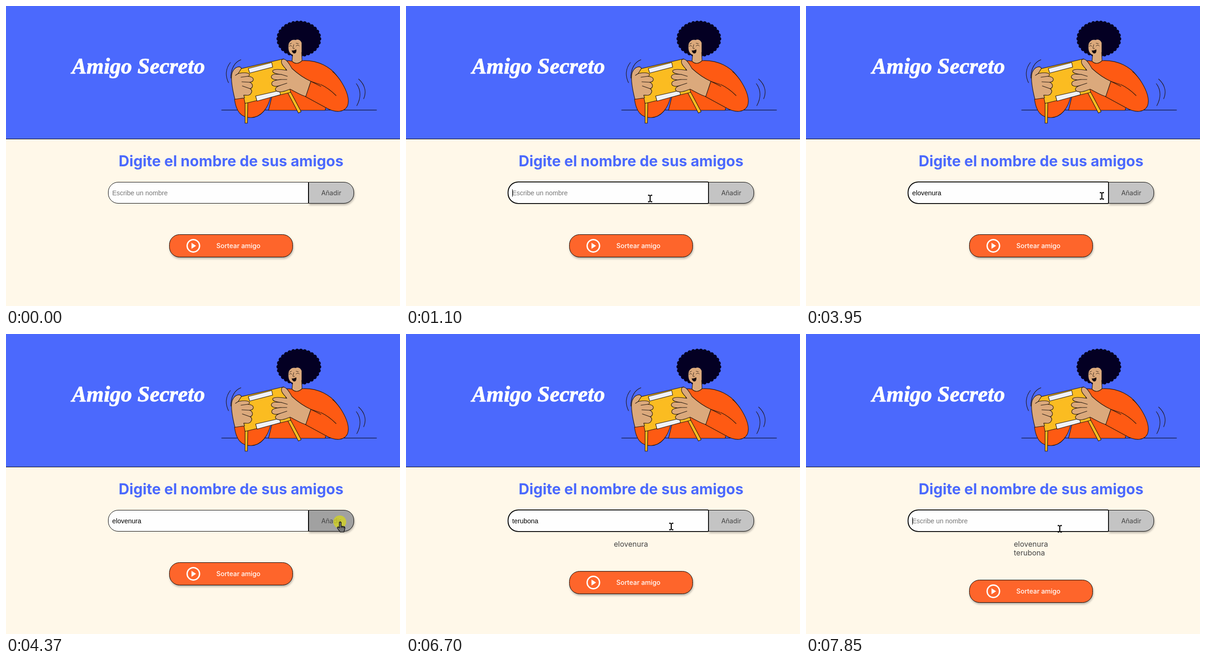
Animation of 857x653 px, one loop 8 s. Source, as an HTML page:

```html
<!DOCTYPE html>
<html lang="es">
<head>
<meta charset="utf-8">
<title>Amigo Secreto</title>
<style>
  html, body { margin: 0; width: 100%; height: 100%; overflow: hidden; background: #fff8e9; }
  svg { display: block; width: 857px; height: 653px; }
  text { font-family: Inter, sans-serif; font-optical-sizing: none; white-space: pre; }
  .title { font: italic 700 48px "Liberation Serif", serif; fill: #fff; stroke: #fff; stroke-width: 1px; }
  .heading { font-size: 32.2px; font-weight: 700; fill: #4b69fd; }
  .field { font: 14.4px "Liberation Sans", Arial, sans-serif; }
  .label { font-size: 14.22px; }
  .item { font-size: 16px; fill: #444; }
  .raised { filter: drop-shadow(1px 3px 2px rgba(0, 0, 0, .3)); }
  .art { stroke: #21160f; stroke-width: 1.15; stroke-linejoin: round; stroke-linecap: round; fill: none; }
  .skin { fill: #dba97c; }
  .shirt { fill: #fe5a13; }
  .gold { fill: #fbbc21; }
  .paper { fill: #f1f2f6; }
  .hair { fill: #040023; stroke: #040023; }
</style>
</head>
<body>
<svg viewBox="0 0 857 653">
  <rect width="857" height="653" fill="#fff8e9"/>
  <rect width="857" height="289" fill="#4b69fd"/>
  <path d="M0 289.5H857" stroke="#000"/>
  <text class="title" x="288" y="147" text-anchor="middle">Amigo Secreto</text>

  <g class="art">
    <path d="M469 226.5H806" stroke="#000" stroke-width="1"/>
    <path d="M488 123C477 137 477 153 484 167M511 117C497 122 489 137 489 157M767 159C782 172 784 189 778 202M762 169C773 183 772 201 763 217"/>

    <ellipse class="hair" cx="637" cy="71.5" rx="44" ry="35"/>
    <ellipse class="hair" cx="637" cy="71.5" rx="44" ry="35" stroke-width="9.5" stroke-dasharray="0 8.3"/>
    <path class="skin" d="M624 101L622 121Q632 130 644 120L643 101Z"/>
    <path class="skin" stroke="none" d="M615 82C613 94 615 103 623 106C632 109 641 107 643 100V80C640 73 634 72 630 74C624 72 618 75 615 82Z"/>
    <path stroke-width=".9" d="M616 88q3-4 6 0M631 87q4-4 7 0M626 84l-2 8q2 2 4 0M617 83l4-2M631 81l5 1"/>
    <path d="M622 97Q627 98 631 95Q632 102 627 103Q623 102 622 97Z" fill="#170b12"/>

    <path class="shirt" d="M571 227L580 190L598 121Q609 118 622 120Q632 130 644 119C681 117 707 135 719 151L694 227Z"/>
    <path class="shirt" d="M663 164L651 197L697 222C717 233 736 232 743 217C748 202 741 184 730 166Q722 153 711 143L684 171Z"/>
    <path class="shirt" stroke="none" d="M676 151L708 141L724 160L719 194L685 174Z"/>
    <path d="M663 164L685 175M685 171Q702 179 718 195"/>

    <path class="shirt" d="M497 203C500 225 508 243 533 243C555 242 570 223 576 196L520 199Z"/>
    <path class="gold" d="M520 210H526L525 255H520Z"/>
    <path class="gold" d="M613 189L619 187L642 230L636 233Z"/>
    <path class="gold" d="M504 138L604 115L619 188L520 212Z"/>
    <path class="paper" d="M527 136L578 123L580 133L530 146ZM543 196L595 184L597 193L546 207Z"/>

    <path class="skin" d="M498 203C493 184 488 157 492 145C497 132 510 129 512 136Q509 141 505 147Q523 143 529 148Q531 152 526 153Q538 154 538 160Q538 165 530 166Q537 169 536 175Q535 179 531 180Q537 184 533 190C530 196 523 194 517 194L519 200Z"/>
    <path d="M505 147L499 151M526 153L511 155M530 166L513 165M531 180L514 174"/>
    <path class="skin" d="M600 117C607 112 614 122 622 136C635 148 650 158 663 164L652 197C638 193 629 186 618 181C610 184 596 190 588 185C583 180 588 176 596 173C586 177 577 174 578 168C579 162 590 161 598 160C588 162 577 160 577 154C578 147 589 148 599 149C589 148 579 146 580 141C583 136 599 138 611 140C606 133 596 126 600 117Z"/>
    <path d="M596 173L611 168M598 160L611 160M599 149L612 153"/>
  </g>

  <text class="heading" x="489.5" y="348.5" text-anchor="middle">Digite el nombre de sus amigos</text>

  <g class="raised">
    <path id="add" d="M658.5 383.5H735A21.5 21.5 0 0 1 756.5 405V408A21.5 21.5 0 0 1 735 429.5H658.5Z" stroke="#000"/>
  </g>
  <text class="label" x="707.5" y="412" text-anchor="middle" fill="#444">Añadir</text>
  <path fill="#fefefe" stroke="#000"
    d="M244 383.5H657.5V429.5H244A21.5 21.5 0 0 1 222.5 408V405A21.5 21.5 0 0 1 244 383.5Z"/>
  <path id="ring" fill="none" stroke="#101010" stroke-width="2"
    d="M244 383H656Q658 383 658 385V428Q658 430 656 430H244A22 22 0 0 1 222 408V405A22 22 0 0 1 244 383Z"/>
  <text id="field" class="field" x="231" y="412"></text>
  <rect id="caret" y="399" width="1" height="16"/>

  <text id="first" class="item" x="452" y="462.5"></text>
  <text id="second" class="item" x="452" y="481.5"></text>

  <g id="draw">
    <rect id="drawBox" class="raised" x="355.5" y="497.5" width="268" height="49" rx="22" stroke="#000"/>
    <circle cx="407.5" cy="522" r="13.5" fill="none" stroke="#fff" stroke-width="3"/>
    <path d="M403.5 515.5L413.5 522L403.5 528.5Z" fill="#fff"/>
    <text class="label" x="505.5" y="527.3" text-anchor="middle" font-weight="500" fill="#fff">Sortear amigo</text>
  </g>

  <g id="cursor">
    <circle id="click" r="14" fill="#d5d51c" opacity=".75"/>
    <path id="arrow" d="M0 0V17L4 13.5L7 20L10 18.5L7 12.5H12Z" fill="#fff" stroke="#000"/>
    <path id="beam" d="M-4.5-7H-1M1-7H4.5M0-7V7M-4.5 7H-1M1 7H4.5" fill="none" stroke="#000" stroke-width="2.3"/>
    <path id="hand" d="M-1 1Q1-1 3 1V9L9 10Q12 11 11 15L9 22H1L-5 14Q-6 10-3 11L-1 13Z M3 9V13M6 10V13M9 11V14" fill="#777" stroke="#000" stroke-width="1.2"/>
  </g>
</svg>
<script>
const LOOP = 8000, BLINK = 520;
const $ = id => document.getElementById(id);
const show = (id, on) => $(id).setAttribute("visibility", on ? "visible" : "hidden");
const set = (id, attrs) => { for (const k in attrs) $(id).setAttribute(k, attrs[k]); };

const entries = [
  { name: "elovenura", focus: 930, keys: [1400, 1560, 1650, 2320, 2420, 2590, 2750, 2960, 3070], blur: 4280, sent: 4450 },
  { name: "terubona", focus: 4950, keys: [5420, 5520, 5620, 5800, 5890, 5990, 6080, 6180], blur: 7340, sent: 7450 },
  { name: "", focus: 7780, keys: [], blur: LOOP, sent: LOOP }
];

// start, end, from x, y, to x, y
const moves = [
  [30, 480, 762, 600, 568, 503],
  [480, 860, 568, 503, 531, 419],
  [3620, 4220, 531, 419, 726, 409],
  [4600, 4900, 726, 409, 577, 419],
  [6710, 7290, 577, 419, 726, 409],
  [7490, 7750, 726, 409, 552, 424]
];
const clicks = [[930, 1070], [4280, 4450], [4950, 5010], [7340, 7450], [7780, 7840]];

const within = (v, a, b) => v >= a && v < b;
const ease = p => p * p * (3 - 2 * p);

function pointer(t) {
  const [a, b, x0, y0, x1, y1] = moves.filter(m => t >= m[0]).pop() || moves[0];
  const p = ease(Math.min(1, Math.max(0, (t - a) / (b - a))));
  return { x: x0 + (x1 - x0) * p, y: y0 + (y1 - y0) * p };
}

function render(t) {
  const entry = entries.find(e => t < e.sent) || entries[2];
  const typed = entry.keys.filter(k => t >= k);
  const value = entry.name.slice(0, typed.length);
  const focused = within(t, entry.focus, entry.blur);
  const sent = entries.filter(e => t >= e.sent).length;
  const shift = sent * 19;

  $("field").textContent = value || "Escribe un nombre";
  set("field", { fill: value ? "#000" : "#757575" });
  show("ring", focused);

  const since = t - (typed.length ? typed[typed.length - 1] : entry.focus);
  show("caret", focused && since % (2 * BLINK) < BLINK);
  set("caret", { x: 231 + (value ? Math.floor($("field").getComputedTextLength()) : 0) });

  $("first").textContent = sent > 0 ? entries[0].name : "";
  $("second").textContent = sent > 1 ? entries[1].name : "";
  set("draw", { transform: `translate(0 ${shift})` });

  const { x, y } = pointer(t);
  const visible = t >= 30;
  const row = within(y, 383, 430);
  const onAdd = visible && row && within(x, 658, 757);
  const onDraw = visible && within(x, 355, 624) && within(y, 497 + shift, 547 + shift);
  const onField = visible && row && within(x, 222, 658);
  set("add", { fill: onAdd ? "#a1a1a1" : "#c4c4c4" });
  set("drawBox", { fill: onDraw ? "#e55720" : "#fe652b" });
  set("cursor", { transform: `translate(${x} ${y})` });
  show("hand", onAdd || onDraw);
  show("beam", onField);
  show("arrow", visible && !onAdd && !onDraw && !onField);
  show("click", clicks.some(([a, b]) => within(t, a, b)));
}

const start = performance.now();
function tick() {
  render((performance.now() - start) % LOOP);
  requestAnimationFrame(tick);
}
tick();
</script>
</body>
</html>
```
